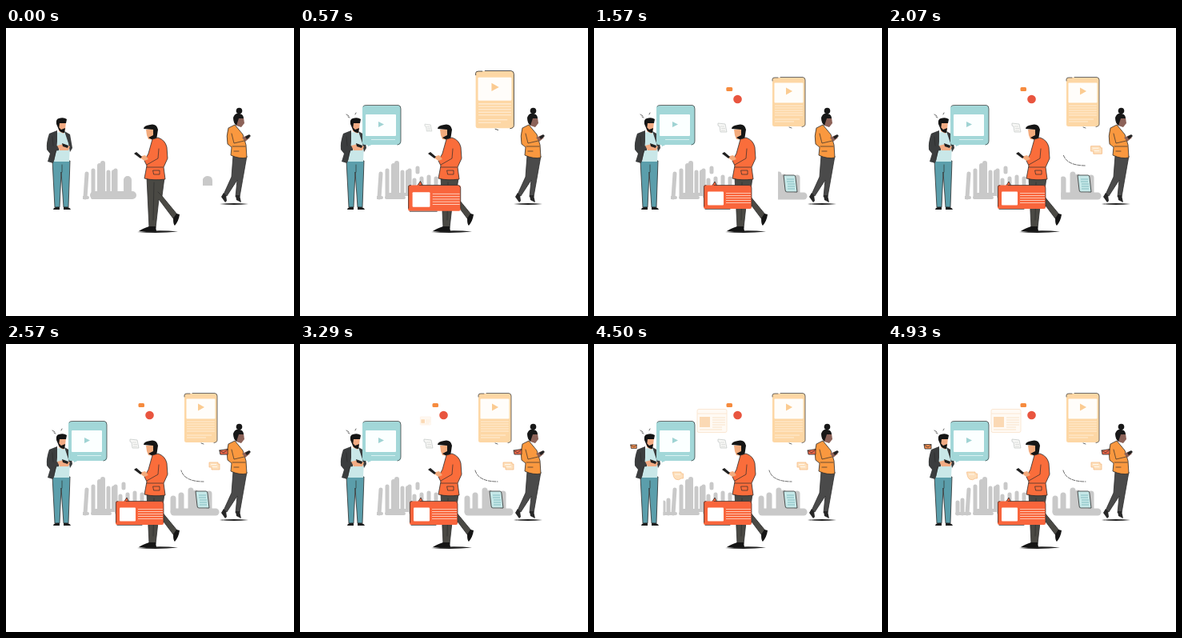
These frames come from a looping animation (360 by 360 pixels, 5 s). An HTML page:

```html
<!DOCTYPE html>
<html lang="en">
<head>
<meta charset="utf-8">
<title>People with phones</title>
<style>
html, body { margin: 0; height: 100%; overflow: hidden; background: #fff; }
svg { display: block; width: 100vw; height: 100vh; }
.city { fill: none; stroke: #c9c9c9; stroke-linecap: round; }
.ink { stroke: #2b2b2b; stroke-width: .8; stroke-linejoin: round; }
.fold { fill: none; stroke: #2b2b2b; stroke-width: .7; stroke-linecap: round; }
</style>
</head>
<body>
<svg viewBox="0 0 360 360">
  <defs>
    <clipPath id="leftClip"><rect id="leftReveal" y="160" width="200" height="56"/></clipPath>
    <clipPath id="rightClip"><rect id="rightReveal" y="160" width="100" height="56"/></clipPath>
  </defs>

  <!-- skyline -->
  <g class="city" clip-path="url(#leftClip)">
    <path stroke-width="5" d="M87 198V212M93 195V212M101 182L99 212M109 178V211M128 180V211M137 178V208"/>
    <path stroke-width="6" d="M117 172V211M121 169V211M135 180V207"/>
    <path stroke-width="4" d="M86 212H102M108 212H130M112 208H134"/>
  </g>
  <path id="startBase" class="city" stroke-width="10" d="M110 209H158M152 190V208"/>
  <g id="middle" class="city">
    <path stroke-width="5" d="M147 175V180M143 190V208M152 188V210M161 186V210M170 188V210"/>
    <path stroke-width="8" d="M140 210H176"/>
  </g>
  <path id="startBlob" fill="#c9c9c9" d="M246 197V189Q248 185 252 185Q258 185 258 191V197Z"/>
  <g class="city" clip-path="url(#rightClip)">
    <path stroke-width="7" d="M209 193V209M219 189V209M231 183V208M237 186V208M254 187V208"/>
    <path stroke-width="9" d="M210 210H262"/>
  </g>

  <!-- standing man -->
  <g>
    <path fill="#5b9eab" class="ink" d="M58 166L61 224H67L69 180L72 224H78L80 166Z"/>
    <path fill="#1c1c1c" d="M59 227Q60 223 67 224V227ZM72 227V224Q79 223 81 227Z"/>
    <path fill="#c9e7e8" d="M62 131L74 129L80 145L79 167H60Z"/>
    <path fill="#3b3d3e" d="M64 128L54 132Q50 143 51 152L55 157L52 167L59 169L63 154L64 142ZM73 129L80 133L83 150L80 155L78 144Z"/>
    <path fill="#3b3d3e" d="M51 148L66 147V153L54 155Z"/>
    <path fill="#f2ab83" d="M65 117H75L74 127L72 132L66 129Z"/>
    <path fill="#151515" d="M63 120Q62 114 66 113Q72 111 76 114L75 119L67 119L66 127ZM66 124L69 127L74 125L73 131Q68 131 66 127Z"/>
    <path fill="#f2ab83" d="M64 147L72 145L80 148L78 153L67 153Z"/>
    <path fill="#202020" d="M70 144L78 147L77 150L71 148Z"/>
    <path class="fold" d="M58 136L59 147M62 154L60 165M70 171V180"/>
  </g>

  <!-- walking man -->
  <g>
    <path fill="#222" d="M164 255Q190 252 215 254.500Q190 257 164 255Z"/>
    <path fill="#4a4944" class="ink" d="M176 187L179 250H187L191 214L209 238L214 233L195 210L198 187Z"/>
    <path fill="#151515" d="M166 254Q170 251 179 248H187L188 254ZM209 238L213 232L217 233Q216 241 211 247Q209 246 209 238Z"/>
    <path fill="#f3ab7d" d="M175 127L186 126L187 140L178 139L176 134Z"/>
    <path fill="#151515" d="M172 126Q172 122 180 121Q188 119 190 127L188 140Q182 140 178 137L184 134L184 127Z"/>
    <path fill="#fa6d3b" class="ink" d="M183 139L190 137Q199 140 201 149L202 163L197 174L199 189Q184 191 173 188L176 172L173 166L178 157Z"/>
    <path fill="#f3ab7d" d="M166 161L174 159L178 164L173 166Z"/>
    <path fill="#202020" d="M160 157L163 155L170 161L168 163Z"/>
    <path class="fold" d="M191 151L190 163L176 171M176 174H196M184 178H192V183H185ZM185 193L184 240M195 210L190 205"/>
  </g>

  <!-- walking woman -->
  <g>
    <path fill="#222" d="M267 220Q285 218 303 220Q285 222 267 220Z"/>
    <path fill="#4a4a4a" class="ink" d="M284 159L282 186L272 208L276 210L289 190L287 211H292L301 160Z"/>
    <path fill="#272727" d="M272 206L269 211L274 218L276 216L275 209ZM287 209L288 215L294 218L292 209Z"/>
    <path fill="#fff" d="M288 122L297 123L300 140L288 136Z"/>
    <path fill="#8c6258" d="M288 111L297 112L298 119L294 124L288 122Z"/>
    <path fill="#181818" d="M284 112Q286 106 292 107Q297 108 297 113L291 113L288 122Q284 119 284 112Z"/>
    <circle cx="291.500" cy="103.500" r="3.800" fill="#181818"/>
    <path fill="#fa983f" class="ink" d="M286 121L278 125Q275 135 277 145L282 149L281 159Q292 164 301 162L300 146L296 133Z"/>
    <path fill="#8c6258" d="M295 137L302 134L305 137L299 142Z"/>
    <path fill="#222" d="M299 136L304 133L306 135L301 139Z"/>
    <path class="fold" d="M282 132L285 144L298 141M283 148H299M285 154H291"/>
  </g>

  <g id="ticks" class="fold"><path d="M58 108L61 110M60 111L62 112M69 108L70 106"/></g>
  <path id="arc" class="fold" stroke-dasharray="4 1.5" d="M219 158Q223 172 247 172"/>

  <!-- cards -->
  <g id="video">
    <path fill="#a2d7d8" d="M83 143L85 148L94 144Z"/>
    <rect x="78" y="97" width="48" height="49" rx="3" fill="#a2d7d8"/>
    <path class="fold" d="M79 98Q80 96 84 96.500H123Q126 97 126 101V141Q126 145 122 146"/>
    <rect x="82" y="108" width="38" height="27" rx="1" fill="#fbffff"/>
    <path fill="#9fd3d3" d="M98 117L105 120.500L98 124Z"/>
    <path stroke="#d9f1f1" d="M89 139.500H119"/>
  </g>
  <g id="article">
    <rect x="223" y="62" width="41" height="61" rx="2.500" fill="#fdd7a5"/>
    <path class="fold" d="M223 66V64Q223 62 226 62H230M233 61.500H261Q264 62 264 65V120Q264 123 260 123.500M244 124L247 125"/>
    <rect x="225.500" y="68.500" width="36" height="25" rx="1" fill="#fffdfa"/>
    <path fill="#fbcb91" d="M240 74.500L248 79L240 83.500Z"/>
    <path stroke="#fff0da" stroke-width=".9" d="M226 97H261M226 100H261M226 103H261M226 106H261M226 109H261M226 114H257M226 117H250"/>
  </g>
  <g id="banner">
    <path fill="#f9653c" class="ink" d="M147 198L151 192L154 198Z"/>
    <rect x="137" y="196.500" width="60" height="29.500" rx="2" fill="#f9653c"/>
    <path class="fold" d="M137.500 223V199Q137 196.500 140 196.500M150 196.500H194Q197 197 197 200V223M139 226.500H170"/>
    <rect x="142" y="204.500" width="20" height="17" rx="1" fill="#fff"/>
    <path stroke="#ffd0bd" stroke-width=".9" d="M165 206.500H196M165 209.500H196M165 212.500H196M165 215.500H196M165 218.500H196"/>
  </g>
  <g id="news">
    <rect x="129" y="81.500" width="37" height="29" rx="2" fill="#fffaf4" stroke="#f9e3cb" stroke-width=".8"/>
    <path stroke="#fbe7d3" d="M129 87H166"/>
    <rect x="132" y="91" width="13" height="13" fill="#fbd9b4"/>
    <path stroke="#f9dfc4" stroke-width=".9" d="M148 92H164M148 95H164M148 98H164M148 101H164M148 104H160M132 107H160"/>
  </g>

  <!-- icons -->
  <g id="paper"><path fill="#f8f8f6" stroke="#bfc4c3" stroke-width=".7" d="M155 119L164 120L166 130H158L157 123L155 122Z"/>
    <path stroke="#c9cdcc" stroke-width=".6" d="M158 123H163M159 125.500H164M159 128H164"/></g>
  <circle id="badge" cx="179.500" cy="89" r="5.300" fill="#e9553f"/>
  <rect id="tag" x="165.500" y="74" width="7.500" height="5" rx="1.500" fill="#f68b3e"/>
  <g id="note"><path fill="#c6e8e8" class="ink" d="M237 184H250Q252 184 252 187L254 205H241Q239 205 239 202Z"/>
    <path stroke="#72b1b6" stroke-width=".8" d="M241 189H250M241 192H250M242 195H251M242 198H251M242 201H251"/></g>
  <g id="chat"><path fill="#fde0bd" stroke="#f5b67a" stroke-width=".7" d="M254 148H265V150H267V157H257V154H254Z"/>
    <path stroke="#fff6e9" d="M256 150.500H263M258 153.500H264"/></g>
  <g id="mail"><path fill="#e96547" class="ink" d="M267 133L277 131.500V138H268Z"/><path class="fold" d="M267 133L272 136L277 132"/></g>
  <g id="cup"><path fill="#fde0bd" stroke="#f5bb83" stroke-width=".7" d="M98.500 160H109V162H111.500V168H109Q106 171 102 169Q99 167 98.500 160Z"/>
    <path stroke="#fff6e9" d="M101 163H108"/></g>
  <g id="letter"><path fill="#ef8d50" class="ink" d="M45 125.500H54V131H46Z"/><path class="fold" d="M45 126L50 129L54 126"/></g>
</svg>
<script>
const LOOP = 5000, FRAME = LOOP / 70;
const $ = id => document.getElementById(id);
// id, start, duration, pivot x, pivot y, overshoot
const pops = [
  ['video', 70, 450, 84, 146, 1.2],
  ['article', 190, 730, 243.5, 110, 2.3],
  ['banner', 190, 730, 157, 197, 1.7],
  ['paper', 430, 500, 160, 125, 1.2],
  ['badge', 1000, 500, 179.5, 89, 1.7],
  ['note', 1000, 500, 245, 195, 1.7],
  ['tag', 1280, 500, 169, 76.5, 1.2],
  ['chat', 1800, 600, 260, 153, 1.7],
  ['mail', 2150, 500, 272, 135, 1.7],
  ['news', 3220, 650, 162, 96, 1],
  ['cup', 3500, 500, 105, 165, 1.7],
  ['letter', 4380, 450, 49.5, 128, 1.7]
];
const progress = (t, start, length) => Math.min(1, Math.max(0, (t - start) / length));

function backOut(p, c) {
  const u = p - 1;
  return 1 + (c + 1) * u ** 3 + c * u * u;
}
function show(id, visible) {
  $(id).setAttribute('visibility', visible ? 'visible' : 'hidden');
}
function draw(t) {
  for (const [id, start, length, x, y, c] of pops) {
    const scale = backOut(progress(t, start, length), c);
    show(id, t > start);
    $(id).setAttribute('transform', `translate(${x} ${y}) scale(${scale}) translate(${-x} ${-y})`);
  }
  show('startBase', t < 140);
  show('startBlob', t < 210);
  show('middle', t > 400);
  show('ticks', t > 450);
  show('arc', t > 1900);
  $('arc').setAttribute('stroke-dashoffset', -t / 300);
  $('leftReveal').setAttribute('x', 96 - 13 * progress(t, 3700, 1100));
  $('rightReveal').setAttribute('x', 268 - 38 * progress(t, 1150, 350) - 26 * progress(t, 1700, 700));
}
function tick(now) {
  const t = now % LOOP;
  draw(Math.floor((t + 8) / FRAME) % 70 * FRAME);
  requestAnimationFrame(tick);
}
draw(0);
requestAnimationFrame(tick);
</script>
</body>
</html>
```
